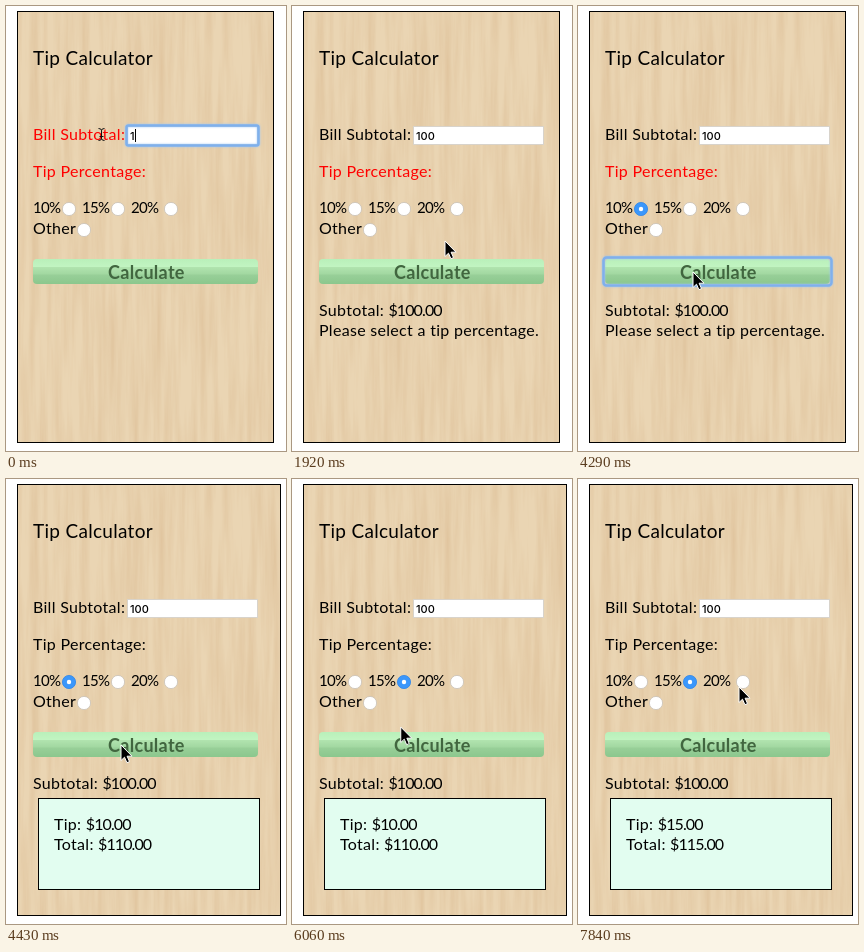
Write an HTML page that moves like this. It is 280 px wide and 445 px high and loops after 7.99 s.

```html
<!DOCTYPE html>
<html lang="en">
<head>
<meta charset="utf-8">
<title>Tip Calculator</title>
<style>
  html, body { margin: 0; height: 100%; overflow: hidden; background: #fff; }
  svg { display: block; width: 100%; height: 100%; }
  text { font: 16px Lato, sans-serif; letter-spacing: .3px; }
  .money { letter-spacing: -.9px; }
  .percent { font-size: 15px; letter-spacing: -.7px; }
  .title { font-size: 19px; }
  .typed { font: 500 11px Inter, sans-serif; letter-spacing: 0; }
  .button { font-weight: 700; font-size: 18px; fill: #41663f; }
  .missing { fill: #f00; }
  .glow { fill: none; stroke: #7fb0ec; stroke-width: 2.5; filter: drop-shadow(0 0 1px #9cc6f8); }
  .radio circle { fill: #fff; stroke: #c9c2b8; stroke-width: .8; }
  .radio.pressed circle { fill: #ccc; stroke: #999; }
  .radio.checked circle { fill: #3b97fb; stroke: #2f86e8; }
  .radio .dot { display: none; }
  .radio.checked .dot { display: inline; fill: #fff; stroke: none; }
</style>
</head>
<body>
<svg viewBox="0 0 280 445" preserveAspectRatio="none">
  <defs>
    <filter id="grain" x="0" y="0" width="1" height="1" color-interpolation-filters="sRGB">
      <feTurbulence type="fractalNoise" baseFrequency=".12 .007" numOctaves="4" seed="4"/>
      <feColorMatrix values="0 0 0 0 .79  0 0 0 0 .62  0 0 0 0 .43  .5 0 0 0 -.16"/>
    </filter>
    <linearGradient id="gloss" x2="0" y2="1">
      <stop stop-color="#b9f0ba"/>
      <stop offset=".3" stop-color="#c1f4c1"/>
      <stop offset=".34" stop-color="#b0e3ae"/>
      <stop offset=".6" stop-color="#a2d8a1"/>
      <stop offset=".64" stop-color="#98cf98"/>
      <stop offset="1" stop-color="#8bc78d"/>
    </linearGradient>
  </defs>

  <rect class="page" x="11.5" y="5.5" height="431" fill="#ead5b3"/>
  <rect class="page" x="11.5" y="5.5" height="431" filter="url(#grain)"/>
  <rect class="page" x="11.5" y="5.5" height="431" fill="none" stroke="#000"/>

  <text class="title" x="27" y="59">Tip Calculator</text>
  <text id="billLabel" x="27" y="134">Bill Subtotal:</text>
  <rect x="121.5" y="120.5" width="130" height="18" fill="#fff" stroke="#d8d3cb"/>
  <rect id="inputGlow" class="glow" x="120.5" y="119.5" width="132" height="20" rx="2"/>
  <text id="bill" class="typed" x="124" y="134"></text>
  <path id="caret" stroke="#000" d="M.5 123v13"/>

  <text id="tipLabel" x="27" y="171">Tip Percentage:</text>
  <text class="percent" x="27" y="207">10%</text>
  <text class="percent" x="76" y="207">15%</text>
  <text class="percent" x="125" y="207">20%</text>
  <text x="27" y="228">Other</text>
  <g id="radios"></g>

  <rect x="27" y="253" width="225" height="25" rx="4" fill="url(#gloss)"/>
  <rect id="buttonGlow" class="glow" x="25.5" y="251.5" width="228" height="28" rx="3"/>
  <text class="button" x="102" y="273">Calculate</text>

  <text id="subtotal" x="27" y="310">Subtotal: <tspan class="money">$100.00</tspan></text>
  <text id="prompt" x="27" y="330">Please select a tip percentage.</text>
  <g id="result">
    <rect x="32.5" y="319.5" width="221" height="91" fill="#e2fdf0" stroke="#000"/>
    <text x="48" y="351">Tip: <tspan class="money" id="tip"></tspan></text>
    <text x="48" y="371">Total: <tspan class="money" id="total"></tspan></text>
  </g>

  <path id="beam" fill="none" stroke="#111" d="M92.5 122.5q3 0 3 2v8q0 2-3 2M98.5 122.5q-3 0-3 2v8q0 2 3 2M93.5 130.5h4"/>
  <path id="arrow" stroke="#fff" stroke-linejoin="round" d="M0 0V15.5l3.5-3.3 2.4 5.5 2.6-1.1-2.4-5.4h4.9z"/>
</svg>
<script>
const DURATION = 7990, TICKS = 54;
const $ = id => document.getElementById(id);
const show = (id, on) => $(id).style.display = on ? '' : 'none';

// Pointer moves between the controls
const moves = [
  { start: 5, ticks: 4, x: 116, y: 265 },
  { start: 12, ticks: 2, x: 153, y: 235 },
  { start: 20, ticks: 4, x: 61, y: 200 },
  { start: 26, ticks: 3, x: 115, y: 266 },
  { start: 34, ticks: 4, x: 108, y: 200 },
  { start: 40, ticks: 4, x: 109, y: 264 },
  { start: 50, ticks: 4, x: 161, y: 208 }
];

function pointerAt(tick) {
  let x = 95, y = 128;
  for (const move of moves) {
    const progress = Math.max(0, Math.min(1, (tick - move.start + 1) / move.ticks));
    const eased = 1 - (1 - progress) ** 2;
    x += (move.x - x) * eased;
    y += (move.y - y) * eased;
  }
  return [x, y];
}

$('radios').innerHTML = [[63, 203], [112, 203], [165, 203], [78, 224]].map(([x, y]) =>
  `<g class="radio" transform="translate(${x} ${y})"><circle r="6.6"/><circle class="dot" r="2.2"/></g>`
).join('');
const radios = [...document.querySelectorAll('.radio')];
const pages = document.querySelectorAll('.page');

function render(tick) {
  const typing = tick < 9, submitted = tick >= 10, calculated = tick >= 30;

  const digits = Math.min(3, tick + 1);
  $('bill').textContent = '100'.slice(0, digits);
  $('caret').setAttribute('transform', `translate(${122 + 7 * digits})`);
  show('caret', typing);
  show('inputGlow', typing);
  show('buttonGlow', tick === 9 || tick === 29);

  $('billLabel').classList.toggle('missing', !submitted);
  $('tipLabel').classList.toggle('missing', !calculated);
  show('subtotal', submitted);
  show('prompt', submitted && !calculated);
  show('result', calculated);

  const tip = tick < 44 ? 10 : 15;
  $('tip').textContent = `$${tip}.00`;
  $('total').textContent = `$${100 + tip}.00`;

  const checked = tick < 25 ? -1 : tick < 39 ? 0 : 1;
  const pressed = [24, 38].indexOf(tick);
  radios.forEach((radio, i) => {
    radio.classList.toggle('checked', i === checked);
    radio.classList.toggle('pressed', i === pressed);
  });

  const overText = tick < moves[0].start;
  show('beam', overText);
  show('arrow', !overText);
  $('arrow').setAttribute('transform', `translate(${pointerAt(tick)})`);

  pages.forEach(page => page.setAttribute('width', calculated ? 263 : 256));
}

function frame() {
  const phase = performance.now() % DURATION / DURATION;
  // The small offset absorbs the rounding of tick times to 10 ms
  render(Math.min(TICKS - 1, Math.floor(phase * TICKS + .08)));
  requestAnimationFrame(frame);
}
frame();
</script>
</body>
</html>
```
